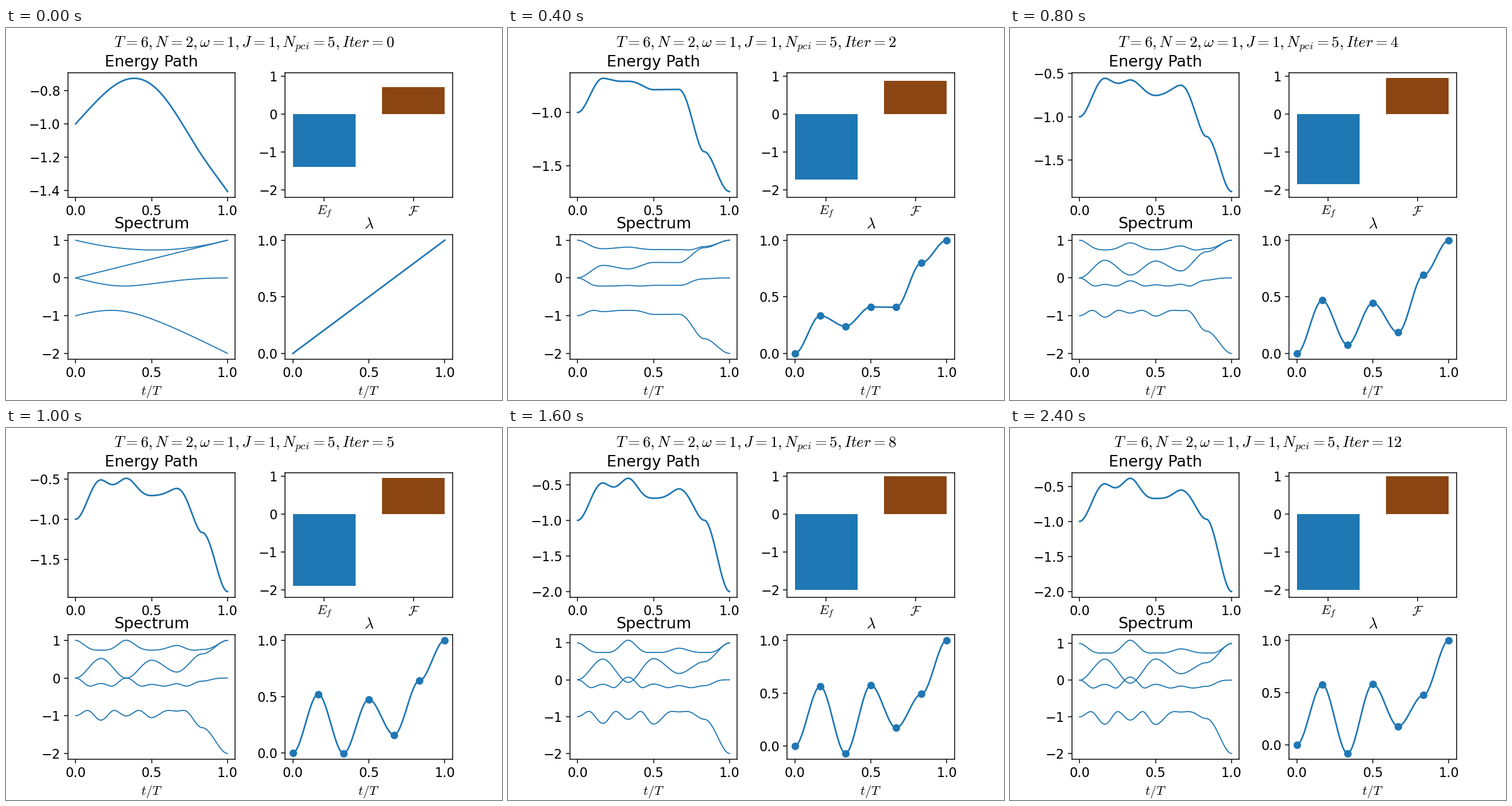
A matplotlib script for the animation above (2.6 s loop, 864 by 648 pixels).

```python
import numpy as np
import matplotlib.pyplot as plt
from matplotlib.animation import FuncAnimation

plt.rcParams.update({
    "font.size": 12,
    "font.family": "DejaVu Sans",
    "mathtext.fontset": "cm",
})

T, N, OMEGA, J, N_PCI = 6, 2, 1, 1, 5
ITERATIONS, INTERVAL = 13, 200
STEPS = 360

# Two coupled spins: transverse start, Ising target with a longitudinal field.
I2, X, Z = np.eye(2), np.array([[0, 1], [1, 0]]), np.diag([1, -1])
H_START = -OMEGA / 2 * (np.kron(X, I2) + np.kron(I2, X))
H_TARGET = -J * np.kron(Z, Z) - OMEGA / 2 * (np.kron(Z, I2) + np.kron(I2, Z))

# Inner control points of the schedule as the optimiser moves them.
CONTROL = {
    1: [0.2503, 0.3213, 0.4030, 0.6053, 0.8588],
    3: [0.4155, 0.1570, 0.4180, 0.2100, 0.7425],
    5: [0.5216, -0.0050, 0.4757, 0.1597, 0.6414],
    6: [0.5430, -0.0370, 0.5250, 0.1650, 0.5660],
    7: [0.5570, -0.0630, 0.5560, 0.1690, 0.5150],
    8: [0.5642, -0.0700, 0.5750, 0.1710, 0.4910],
    9: [0.5710, -0.0790, 0.5757, 0.1745, 0.4780],
    10: [0.5735, -0.0820, 0.5765, 0.1755, 0.4747],
    11: [0.5750, -0.0840, 0.5790, 0.1755, 0.4750],
}
KNOTS = np.linspace(0, 1, N_PCI + 2)
TIMES = np.linspace(0, 1, STEPS + 1)


def control_points(iteration):
    columns = np.array(list(CONTROL.values())).T
    inner = [np.interp(iteration, list(CONTROL), c) for c in columns]
    return np.array([0, *inner, 1])


def schedule(s, points):
    """Piecewise cubic through the points, flat at every knot."""
    if points is None:
        return s
    cell = np.minimum((s * (N_PCI + 1)).astype(int), N_PCI)
    u = s * (N_PCI + 1) - cell
    return points[cell] + (points[cell + 1] - points[cell]) * u * u * (3 - 2 * u)


def hamiltonian(lam):
    lam = lam[:, None, None]
    return (1 - lam) * H_START + lam * H_TARGET


def evolve(points):
    """Return the spectrum, the energy along the path and the final fidelity."""
    h = hamiltonian(schedule(TIMES, points))
    middle = (TIMES[1:] + TIMES[:-1]) / 2
    levels, vectors = np.linalg.eigh(hamiltonian(schedule(middle, points)))
    phases = np.exp(-1j * levels * T / STEPS)

    psi = np.full(4, 0.5, dtype=complex)
    states = [psi]
    for v, phase in zip(vectors, phases):
        psi = v @ (phase * (v.T @ psi))
        states.append(psi)
    states = np.array(states)
    energy = np.einsum("ti,tij,tj->t", states.conj(), h, states).real
    return np.linalg.eigvalsh(h), energy, abs(psi[0]) ** 2


fig, axes = plt.subplots(2, 2, figsize=(6.4, 4.8), dpi=135)
fig.subplots_adjust(left=0.125, right=0.9, bottom=0.11, top=0.88,
                    wspace=0.3, hspace=0.3)
(ax_path, ax_bars), (ax_levels, ax_lambda) = axes


def draw(iteration):
    points = control_points(iteration) if iteration else None
    spectrum, energy, fidelity = evolve(points)
    for ax in axes.flat:
        ax.clear()

    ax_path.plot(TIMES, energy, color="C0")
    ax_path.set_title("Energy Path")

    ax_bars.bar([0, 1], [energy[-1], fidelity], width=0.7,
                color=["C0", "saddlebrown"])
    ax_bars.set_xticks([0, 1], labels=["$E_f$", r"$\mathcal{F}$"])
    ax_bars.set_ylim(-2.2, 1.1)

    ax_levels.plot(TIMES, spectrum, color="C0", lw=1)
    ax_levels.set_title("Spectrum")
    ax_levels.set_xlabel("$t/T$")

    ax_lambda.plot(TIMES, schedule(TIMES, points), color="C0")
    if points is not None:
        ax_lambda.plot(KNOTS, points, "o", color="C0")
    ax_lambda.set_title(r"$\lambda$")
    ax_lambda.set_xlabel("$t/T$")

    fig.suptitle(rf"$T = {T}, N = {N}, \omega = {OMEGA}, J = {J}, "
                 rf"N_{{pci}} = {N_PCI}, Iter = {iteration}$")
    return []


anim = FuncAnimation(fig, draw, frames=ITERATIONS, interval=INTERVAL,
                     repeat=True, repeat_delay=0)
plt.show()
```
